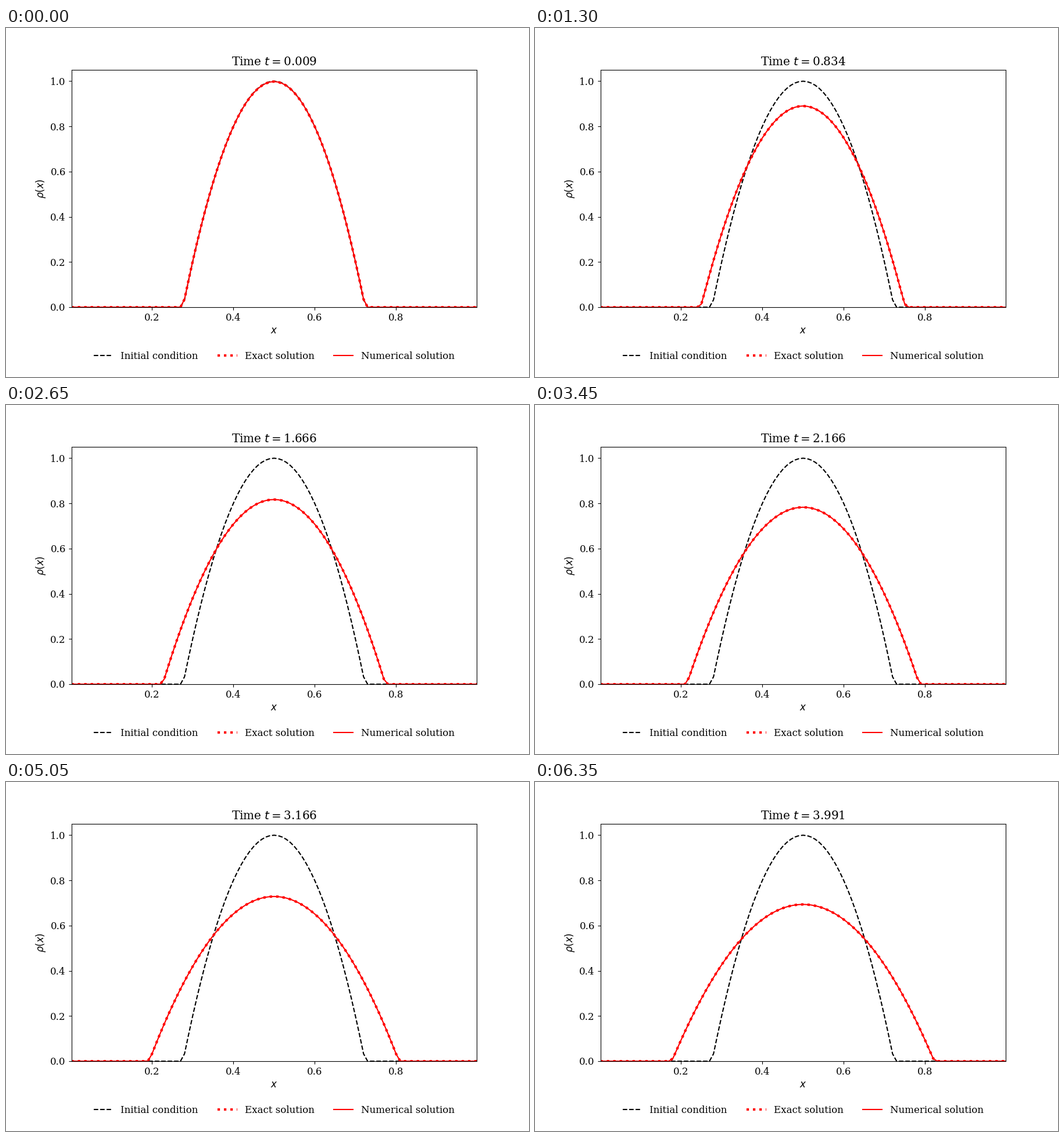
These frames come from a looping animation (900 by 600 pixels, 6.4 s). A matplotlib script:

```python
import numpy as np
import matplotlib.pyplot as plt
from matplotlib.animation import FuncAnimation

plt.rcParams.update({"font.family": "DejaVu Serif", "font.size": 12})

FRAMES, INTERVAL = 128, 50
DX = 0.01
LO, HI = 1 / 512, 511 / 512
RADIUS2 = 0.05  # squared half-width of the initial profile

centres = np.arange(101) * DX
x = np.clip(centres, LO, HI)


def density(t):
    """Cell averages of the spreading Barenblatt profile."""
    s = np.cbrt(1 + t / 2)
    w2 = RADIUS2 * s**2
    w = np.sqrt(w2)

    def mass(y):
        y = np.clip(y, -w, w)
        return (y - y**3 / (3 * w2)) / s

    y = centres - 0.5
    return (mass(y + DX / 2) - mass(y - DX / 2)) / DX


def time_at(i):
    return 0.00625 * (5 * i + 1.5 + 2 * (i // 2 % 2))


fig, ax = plt.subplots(figsize=(9, 6), dpi=100)
fig.subplots_adjust(left=0.125, right=0.9, bottom=0.2, top=0.88)

ax.plot(x, density(0), "k--", lw=1.5, label="Initial condition")
exact, = ax.plot(x, density(0), "r:", lw=3, label="Exact solution")
numeric, = ax.plot(x, density(0), "r-", lw=1.5, label="Numerical solution")

ax.set_xlim(LO, HI)
ax.set_ylim(0, 1.05)
ax.set_xlabel("$x$")
ax.set_ylabel(r"$\rho(x)$")
title = ax.set_title("")
ax.legend(loc="upper center", bbox_to_anchor=(0.5, -0.15), ncol=3, frameon=False)


def update(i):
    t = time_at(i)
    rho = density(t)
    exact.set_ydata(rho)
    numeric.set_ydata(rho)
    title.set_text(f"Time $t = ${t:.3f}")
    return exact, numeric, title


anim = FuncAnimation(fig, update, frames=FRAMES, interval=INTERVAL,
                     repeat=True, repeat_delay=0)
plt.show()
```
